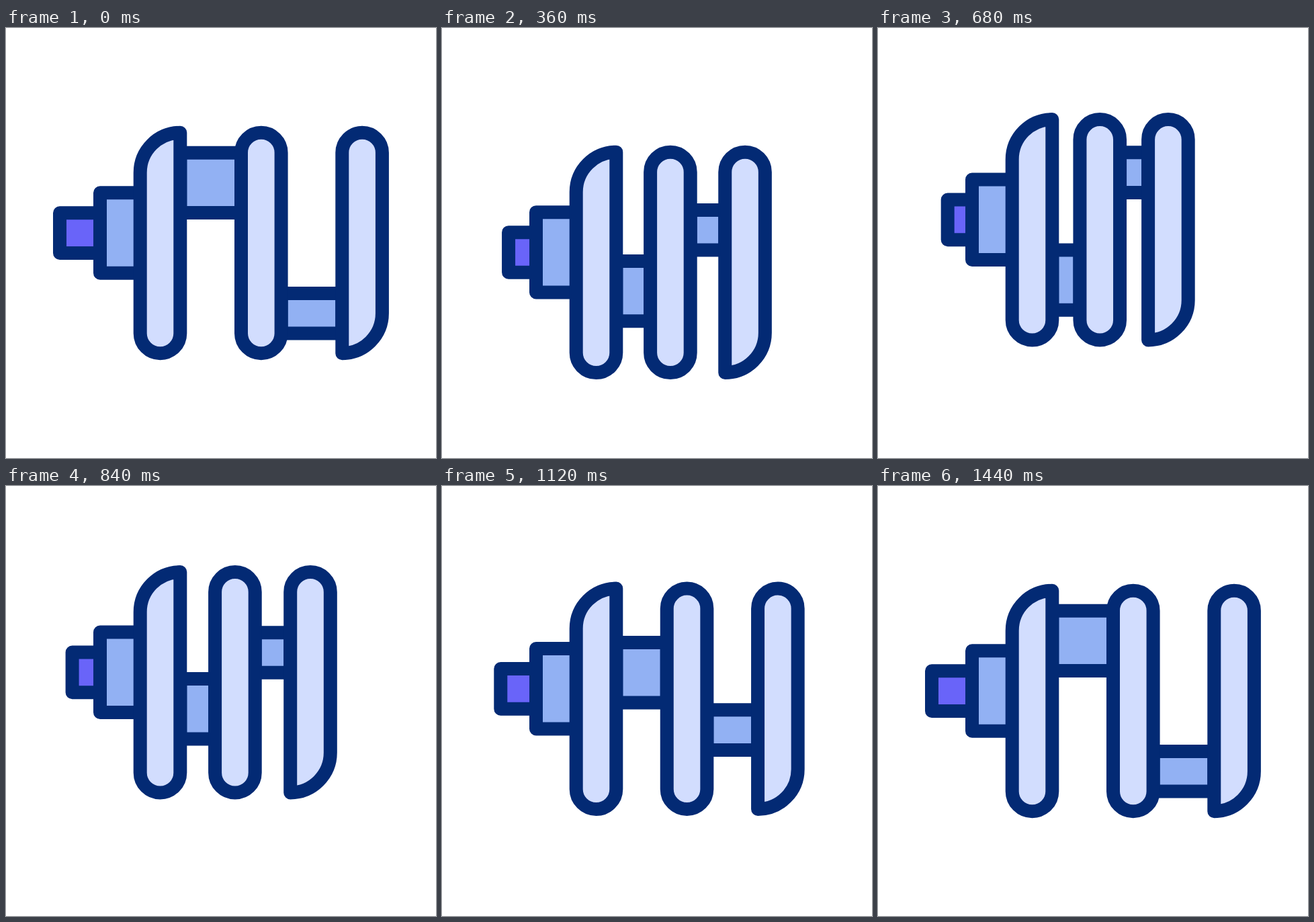
An HTML page that plays this animation: 640 by 640 pixels, repeating every 1480 ms.

```html
<!DOCTYPE html>
<html lang="en">
<head>
<meta charset="utf-8">
<title>Crankshaft</title>
<style>
  html, body { margin: 0; height: 100%; overflow: hidden; background: #fff; }
  svg { display: block; width: 100%; height: 100%; }
  #shaft { stroke: #032a74; stroke-width: 20; stroke-linejoin: round; }
  .plate { fill: #d2ddfe; }
  .pin { fill: #92b1f3; }
  .tip { fill: #6964f9; }
</style>
</head>
<body>
<svg viewBox="0 0 640 640">
  <g id="shaft">
    <rect id="tip" class="tip" x="80" y="275.3" width="80" height="59.6"/>
    <rect class="pin" x="140" y="245.3" width="60" height="119.4"/>
    <rect id="pinA" class="pin" x="259.3" height="89.4"/>
    <rect id="pinB" class="pin" height="59.6"/>
    <path class="plate" d="M259.3 155.8V454.4a29.8 29.8 0 0 1-59.6 0V215.4a59.6 59.6 0 0 1 59.6-59.6z"/>
    <rect id="middle" class="plate" x="350" y="155.8" width="59.6" height="328.4" rx="29.8"/>
    <path id="end" class="plate" d="M500.3 484.2V185.6a29.8 29.8 0 0 1 59.6 0V424.6a59.6 59.6 0 0 1-59.6 59.6z"/>
  </g>
</svg>
<script>
const LOOP = 1480, STEP = 40;
const $ = id => document.getElementById(id);
const set = (id, attrs) => {
  for (const name in attrs) $(id).setAttribute(name, attrs[name]);
};
const shift = (id, x, y = 0) => set(id, { transform: `translate(${x} ${y})` });

// Keys are [time, value, initial slope]; every segment eases to rest.
const squeeze = [[50, 0], [516, 1], [1446, 0]];
const bob = [[50, 0], [320, 30], [803, -29.3, 0.4], [1210, 0]];

function track(keys, t) {
  if (t <= keys[0][0]) return keys[0][1];
  for (let i = 1; i < keys.length; i++) {
    const [t0, v0, slope = 0] = keys[i - 1], [t1, v1] = keys[i];
    if (t < t1) {
      const u = (t - t0) / (t1 - t0);
      return v0 + (v1 - v0) * (u * u * (3 - 2 * u) + slope * u * (1 - u) ** 2);
    }
  }
  return keys[keys.length - 1][1];
}

function draw(now) {
  const t = Math.floor((now % LOOP) / STEP) * STEP;
  const p = track(squeeze, t);
  const middle = -54 * p, end = -107 * p;
  shift("shaft", 0, track(bob, t));
  shift("tip", 25.8 * p);
  shift("middle", middle);
  shift("end", end);
  set("pinA", { y: 185.7 + 179.2 * p, width: 90.7 + middle });
  set("pinB", { x: 409.6 + middle, y: 395 - 207 * p, width: 90.7 + end - middle });
}

function loop() {
  draw(performance.now());
  requestAnimationFrame(loop);
}
loop();
</script>
</body>
</html>
```
